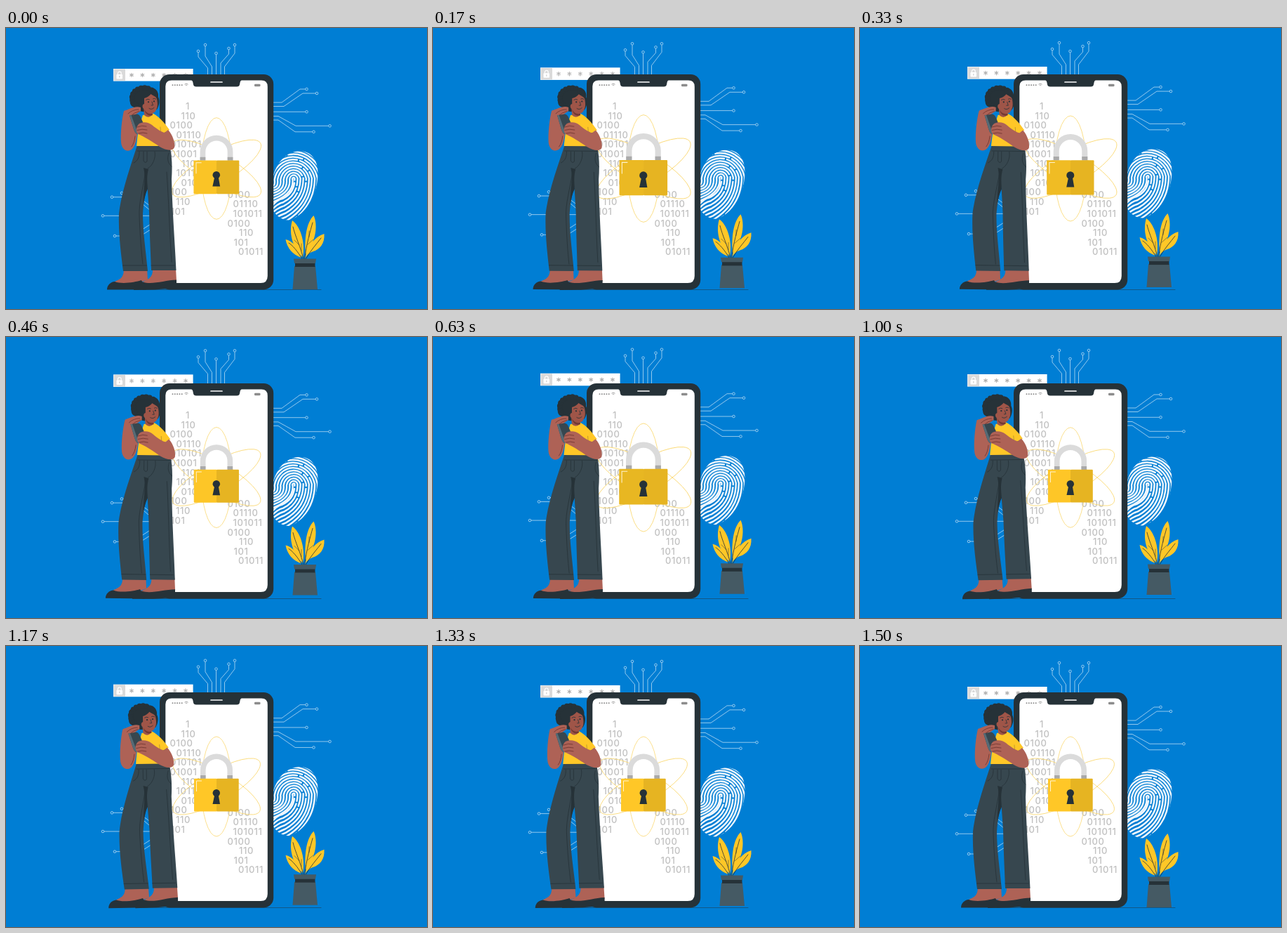
Write an HTML page that moves like this. It is 600 by 400 pixels and loops after 1540 ms.

```html
<!DOCTYPE html>
<html lang="en">
<head>
<meta charset="utf-8">
<title>Data security</title>
<style>
  html, body { margin: 0; width: 100%; height: 100%; overflow: hidden; background: #007ed4; }
  svg { display: block; width: 600px; height: 400px; }
  text { font: 500 13px Inter, "Open Sans", sans-serif; letter-spacing: .6px; fill: #c0c0c0; }
  .wire { fill: none; stroke: #d3e8f8; stroke-width: .7; }
  .line { fill: none; stroke: #263238; stroke-width: .8; stroke-linecap: round; stroke-linejoin: round; }
  .thin { stroke-width: .5; }
  .dark { fill: #263238; }
  .denim { fill: #37474f; }
  .gold { fill: #ffc727; }
  .skin { fill: #ae6256; }
  .shade { fill: #9f5548; }
  .crease { fill: none; stroke: #6d342f; stroke-width: .8; stroke-linecap: round; }
</style>
</head>
<body>
<svg viewBox="0 0 600 400" xmlns="http://www.w3.org/2000/svg">
  <defs>
    <clipPath id="thumb"><path d="M412 176C432 172 445 185 444.500 208C444 236 428 266 404 273.500C390 274 376 262 376 240C377 210 388 181 412 176Z"/></clipPath>
  </defs>

  <path class="line thin" d="M195 372.500H449"/>

  <g class="float">
    <g id="wires" class="wire"></g>

    <rect x="153" y="58" width="113.600" height="17.600" fill="#fff"/>
    <rect x="153.500" y="58.500" width="16.500" height="16.600" fill="#dadada"/>
    <rect x="157.500" y="66" width="8.500" height="6.500" rx=".8" fill="#fff"/>
    <path d="M159.400 66.500v-2a2.400 2.400 0 0 1 4.800 0v2" fill="none" stroke="#fff" stroke-width="1.200"/>
    <path d="M161.800 68v2.500" stroke="#c4c4c4"/>
    <path id="stars" stroke="#adadad" stroke-width="1.100" fill="none"/>

    <g clip-path="url(#thumb)">
      <g id="ridges" fill="none" stroke="#eef5fb" stroke-width="2.500" stroke-linecap="round"></g>
    </g>

    <g id="plant">
      <path class="gold" d="M423 326C407 312 403 290 408 274C418 281 427 302 423 326Z"/>
      <path class="gold" d="M427 322C425 300 428 277 438.500 267C444.500 280 442 304 427 322Z"/>
      <path class="gold" d="M421 327C408 322 401 314 398.500 301C408 303 418 313 421 327Z"/>
      <path class="gold" d="M426 328C431 308 441 297 453.500 293C454.500 307 447 315 438 318C432 320 429 323 426 328Z"/>
      <path class="line" d="M424 329C420 312 412 296 409 283M425.500 329C428 308 434 288 437 277M422 329C416 318 408 309 403 306M427 329C433 318 443 307 449 299"/>
      <path class="line thin" d="M418 309L411 302M421 317L421 307M430 308L438 301M432 297L432 289"/>
      <path d="M411 339H441L444 372H408.500Z" fill="#455a64"/>
      <path class="dark" d="M412 334H440.500V340H412Z"/>
      <path d="M410 328.500H442L441 335H411Z" fill="#455a64"/>
    </g>
  </g>

  <rect class="dark" x="219" y="66" width="162.200" height="306.400" rx="14"/>
  <path fill="#fff" d="M236 74.500H264Q266 74.500 266.500 78L267 80.500Q267.500 83.500 271 83.500H329Q332.500 83.500 333 80.500L333.500 78Q334 74.500 336 74.500H364Q372.800 74.500 372.800 83.500V353Q372.800 363 363 363H236Q227.300 363 227.300 354V83Q227.300 74.500 236 74.500Z"/>
  <path d="M292 77H308" stroke="#fff" stroke-width="1.700" stroke-linecap="round"/>
  <path d="M237.500 81.300H252" stroke="#8c8c8c" stroke-width="2" stroke-linecap="round" stroke-dasharray="0 3.300"/>
  <path d="M254.500 80.200Q257 78 259.500 80.200M255.700 81.700Q257 80.600 258.300 81.700" fill="none" stroke="#8c8c8c" stroke-width=".8"/>
  <rect x="354" y="79.700" width="8.500" height="3.600" rx="1.300" fill="#8c8c8c"/>
  <g id="bits"></g>

  <g id="lock">
    <g id="orbits" fill="none" stroke="#fbd972" stroke-width=".8"></g>
    <path d="M280.800 188V176.500a19.200 19.200 0 0 1 38.400 0V188" fill="#fff" stroke="#dbdbdb" stroke-width="7.600"/>
    <path d="M277 184h7.600v5H277zM315.400 184h7.600v5h-7.600z" fill="#aaa"/>
    <rect id="face" x="268" y="188.800" width="32.500" height="46.700" rx="1"/>
    <rect x="300" y="188.800" width="31.700" height="46.700" rx="1" fill="#e6b422"/>
    <path d="M271.500 207V192H279" fill="none" stroke="#fff3cf" stroke-width="1"/>
    <path class="dark" d="M297.500 211H302.500L305 225H294.500Z"/>
    <circle class="dark" cx="299.800" cy="209.200" r="5.200"/>
  </g>

  <g id="woman">
    <path class="skin" d="M168 342H201L202 358C190 364 168 364 152 363C160 357 168 359 168 342Z"/>
    <path class="dark" d="M144 372.500C144 366 149 361.500 155 361C165 365 184 362 193 359L200 372.500Z"/>
    <path class="skin" d="M209 342H242L243 360C225 366 205 365 192 364C200 357 210 358 209 342Z"/>
    <path class="dark" d="M182 373C183 366 189 362 195 361.500C208 366 226 359 243 358.500V370.500Q230 371 212 372.500Z"/>
    <path class="denim" d="M187 167C178 195 164 235 161 264C160 292 164 322 167 346H202C199 315 195 290 195 264C196 248 199 234 201.500 226L204 262C204.500 290 206 318 207 345H242.500C241 310 237 260 236 215C237 200 237 182 233 167Z"/>
    <path class="dark" d="M196 199L203 201C200.500 210 201 218 202 229C199 235 197 243 196 250C195 234 200 214 196 199Z"/>
    <path class="line" d="M166.500 338H200.500M207 338H240M187 175H234M212 176C214 185 209 196 202 200M190 176C190 184 188 189 182 192M196 176V189Q198 193 201 190V176M232 178C229 187 231 193 236 197M229 205C232 245 233 290 236 333M199 203C195 230 189 250 190 268C191 295 193 320 195 336"/>
    <path class="gold" d="M195 124L209 121.500C217 125 226 135 233 145L224 150L223 168H186C187 158 188 148 190 140Z"/>
    <path class="line thin" d="M220 141Q222 150 219 158" opacity=".6"/>
    <path class="dark" d="M177 103C175 94 180 87 187 86C191 81 202 81 206 85C213 84 218 91 217 98C220 104 218 111 215 116L199 119C191 120 187 116 185 113C179 113 176 109 177 103Z"/>
    <g class="dark" id="curls"></g>
    <path class="shade" d="M196 112L197 124Q203 130 209 123L208 116Z"/>
    <path d="M197 116Q202 124 209 121.500V124Q200 127 197 116Z" fill="#743a33"/>
    <path class="shade" d="M197 100C201 99 204 97 206.500 94C210 97 214 97 215 101C216.500 108 216.500 114 212.500 119C209 123.500 202 121 198.500 116C194 115.500 193 109 197 108Z"/>
    <circle class="dark" cx="203" cy="105.300" r="1.100"/>
    <circle class="dark" cx="211" cy="104.400" r="1.100"/>
    <path class="line" d="M199.500 102.300Q202 100.300 204.500 101.800M209.500 100.800Q211.500 99.600 213.500 101M208 105L209.500 110H207M204 114.500Q207.500 117 211 113.500"/>
    <path class="skin" d="M192 113C184 110 175 116 168 118C165 130 163 150 164 163C165 174 174 178 180 172C186 166 187 152 188 143L181 126L192 118Z"/>
    <path class="crease" d="M174 122Q180 116 189 116M178 125Q183 120 190 118.500M184 154Q183 164 179 169"/>
    <path d="M176 124.500L187 122.500Q190 123 191.500 126L196 136L195 146L186 151Q183 148 182 144Z" fill="#37474f"/>
    <path d="M176 124.500L178.500 124L188 150L186 151Q183 148 182 144Z" fill="#566b76"/>
    <path class="skin" d="M231 145C238 153 241 163 240 170C237 176 228 174 219 169C209 162 196 154 188 151C184 146 186 139 190 136C196 133 203 134 208 138C215 144 222 148 226 149Z"/>
    <path class="crease" d="M187 141Q194 138 200 140M187 145.500Q194 143 201 145M189 150Q195 148 201 150"/>
  </g>
</svg>
<script>
const $ = id => document.getElementById(id);
const ring = (x, y) => `<circle cx="${x}" cy="${y}" r="1.8"/>`;

// Each wire: node centre, path leaving its rim
const wires = [
  [274, 33, "M274 35V41L287.500 57V90"], [284, 24, "M284 26V40L293.500 55V90"],
  [299.5, 36, "M299.500 38V90"], [317.5, 29, "M317.500 31V37L306 50V90"],
  [326, 24, "M326 26V36L311.500 55V90"],
  [428.5, 87, "M426.500 87H419L393 106H370"], [443, 93, "M441 93H423L396 111.500H370"],
  [428.5, 119.3, "M426.500 119.300H370"], [461.5, 139.3, "M459.500 139.300H413L388 125.500H370"],
  [438.5, 147.8, "M436.500 147.800H412L388 131H370"],
  [165, 235, "M167 235H181L225 268"], [151, 240.7, "M153 240.700H183L225 276"],
  [138, 267.3, "M140 267.300H225"], [155, 296, "M157 296H180L225 267"],
  [172, 302, "M174 302H182L225 275"]
];
$("wires").innerHTML = wires.map(([x, y, d]) => ring(x, y) + `<path d="${d}"/>`).join("");

let stars = "";
for (let i = 0; i < 6; i++)
  for (let a = 0; a < 3; a++) {
    const q = Math.PI * (a / 3 + .5), dx = 3.1 * Math.cos(q), dy = 3.1 * Math.sin(q), x = 179 + 15.4 * i;
    stars += `M${x - dx} ${67 - dy}L${x + dx} ${67 + dy}`;
  }
$("stars").setAttribute("d", stars);

// Loops over the core whose right legs sweep down to the left
let ridges = "";
for (let i = 0; i < 13; i++) {
  const r = 1.5 + 4.3 * i, l = 410 - r, e = 410 + r * .95;
  ridges += `<path stroke-dasharray="${60 + i * 13 % 29} 4 ${90 + i * 7 % 23} 4" d="M374 ${250 - i * 4.6}` +
    `Q${l + 2} ${238 - i * 1.5} ${l} 216A${r} ${r * 1.13} 0 0 1 ${e} 214` +
    `C${e} ${230 + i * 2} ${404 + r * .6} ${238 + i * 4} ${394 + i} ${243 + i * 5.2}Q386 ${244 + i * 6} 376 ${257 + i * 5}"/>`;
}
$("ridges").innerHTML = ridges;

// Two columns of digits, one row every 13.6 px
const columns = [
  [116, "256 1,249.500 110,233.500 0100,242.500 01110,234 010101,233.500 01001,250 1101,242.500 1011,249.500 0101,234.500 100,242 110,234.500 101"],
  [241.7, "315.500 0100,323.500 01110,323.500 101011,315.500 0100,332 110,324.500 101,331 01011"]
];
$("bits").innerHTML = columns.map(([y, rows]) => rows.split(",").map((row, i) => {
  const [x, s] = row.split(" ");
  return `<text x="${x}" y="${y + 13.6 * i}">${s}</text>`;
}).join("")).join("");

$("orbits").innerHTML = [0, 60, -60].map(a =>
  `<ellipse cx="300" cy="200" rx="21.500" ry="71" transform="rotate(${a} 300 200)"/>`).join("");

let curls = "";
for (let i = 0; i < 13; i++) {
  const a = 2.3 + i * .31;
  curls += `<circle cx="${196.5 + 17 * Math.cos(a)}" cy="${99.5 + 14.5 * Math.sin(a)}" r="3.7"/>`;
}
$("curls").innerHTML = curls;

const LOOP = 1540, STEP = 125 / 3, STEPS = 36;
const beats = [[0, 0], [.14, 1], [.28, 0], [.42, 1], [.7, 0], [1, 0]];
const ease = u => u * u * (3 - 2 * u);
const mix = (a, b, u) => Math.round(a + (b - a) * u);

function beat(p) {
  const i = Math.max(1, beats.findIndex(b => b[0] >= p));
  const [p0, v0] = beats[i - 1], [p1, v1] = beats[i];
  return v0 + (v1 - v0) * ease((p - p0) / (p1 - p0));
}

function draw(ms) {
  const k = Math.min(STEPS, Math.floor((ms % LOOP + 2) / STEP)), p = k / STEPS;
  const lift = -7.5 * (1 - Math.abs(1 - 2 * p));
  const pulse = beat(Math.max(k, 1.5) / STEPS);
  const size = 1 + .085 * pulse;
  document.querySelector(".float").setAttribute("transform", `translate(0 ${lift})`);
  $("lock").setAttribute("transform", `translate(300 200) scale(${size}) translate(-300 -200)`);
  $("face").setAttribute("fill", `rgb(${mix(255, 232, pulse)},${mix(199, 183, pulse)},${mix(39, 34, pulse)})`);
  $("woman").setAttribute("transform", `rotate(${.9 * Math.sin(2 * Math.PI * p)} 193 228)`);
}

const start = performance.now();
function tick() {
  draw(performance.now() - start);
  requestAnimationFrame(tick);
}
tick();
</script>
</body>
</html>
```
